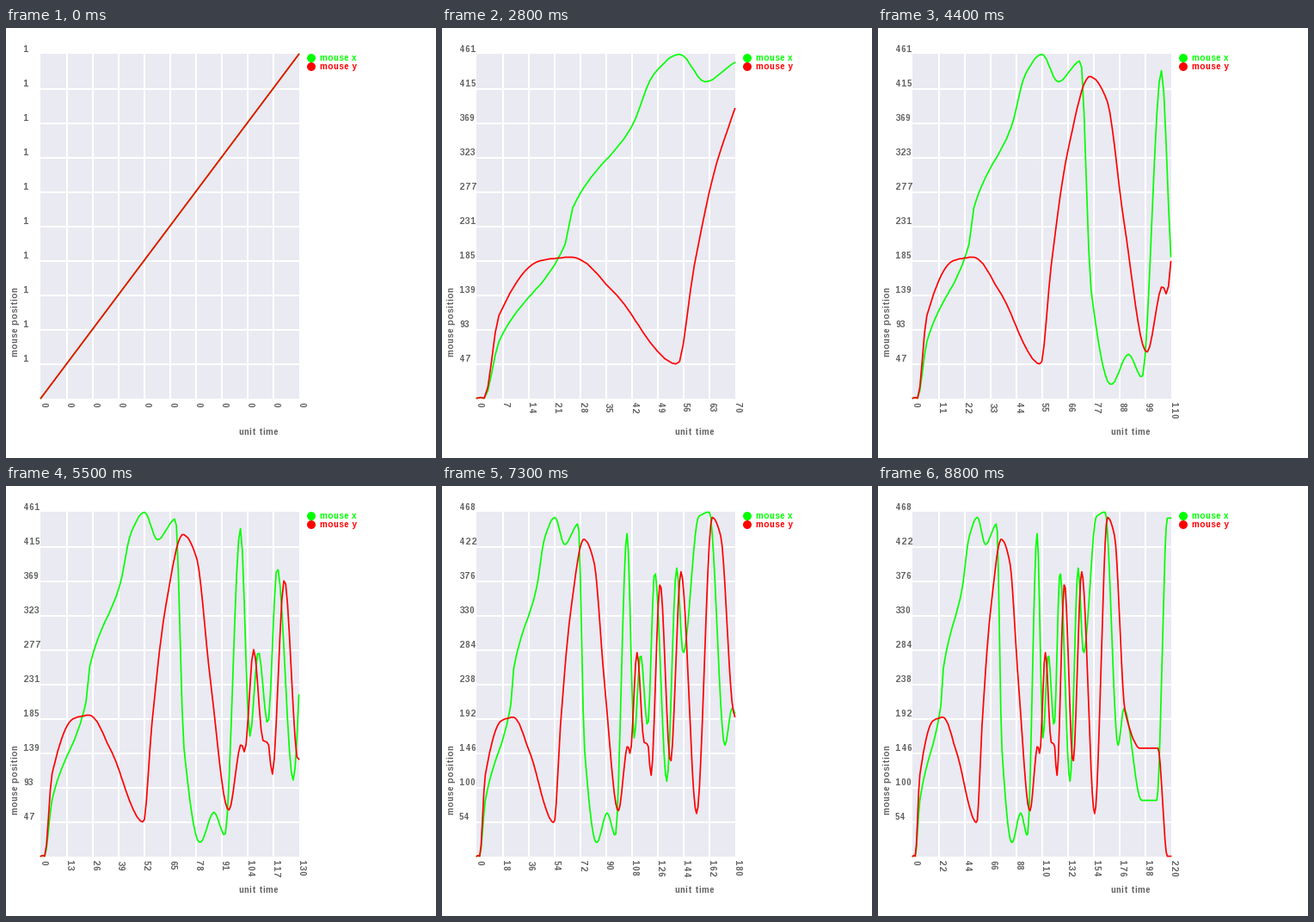
These frames come from a looping animation (500x500 px, 8.9 s). A matplotlib script:

```python
import numpy as np
import matplotlib.pyplot as plt
from matplotlib.animation import FuncAnimation
from matplotlib.patches import Circle, Rectangle

# Whole-pixel letter spacing
plt.rcParams["text.hinting_factor"] = 1

SIZE, DPI = 500, 100
FRAMES, INTERVAL = 89, 100
PX = 72 / DPI
LEFT, TOP, WIDTH, HEIGHT, TICKS = 40, 30, 300, 400, 10
STEP_X, STEP_Y = WIDTH // TICKS, HEIGHT // TICKS
SAMPLES_PER_FRAME = 2.5
GREY, GREEN, RED = "#646464", "#00ff00", "#ff0000"

# Where each hand movement turns: (sample, position)
TURNS_X = [
    (0, 0), (1, 1), (2, 0), (6, 76), (24, 207), (26, 255), (42, 364),
    (48, 434), (55, 461), (62, 424), (71.5, 452), (76, 145), (84.5, 18),
    (92, 59), (97.7, 28), (106, 439), (111, 161), (115.5, 275), (120.5, 177),
    (125.5, 387), (134, 102), (141, 392), (145.5, 276), (156.5, 462),
    (164, 468), (175, 151), (180, 201), (195, 76), (208, 76), (217, 460),
    (220, 460),
]
TURNS_Y = [
    (0, 0), (1, 1), (2, 0), (6, 111), (17, 184), (26, 189), (37, 143),
    (54.5, 46), (59, 178), (66, 330), (75.5, 431), (82.5, 402), (90, 237),
    (99.8, 62), (106.5, 150), (108.2, 140), (113, 277), (118, 155),
    (120.7, 152), (122.8, 109), (129.3, 371), (136.6, 128), (144, 387),
    (155, 58), (166, 461), (172, 436), (181, 197), (194, 147), (209, 147),
    (217, 0), (220, 0),
]


def trace(turns):
    """Monotone cubic easing between turns, sampled at whole steps."""
    t, v = np.array(turns, float).T
    h = np.diff(t)
    d = np.diff(v) / h
    m = np.zeros(len(t))
    same = d[:-1] * d[1:] > 0
    a, b = d[:-1][same], d[1:][same]
    m[1:-1][same] = 2 * a * b / (a + b)
    s = np.arange(int(t[-1]) + 1)
    k = np.clip(np.searchsorted(t, s, side="right") - 1, 0, len(h) - 1)
    u = (s - t[k]) / h[k]
    rise = u * u * (3 - 2 * u)
    bend = h[k] * (u * (1 - u) ** 2 * m[k] - u * u * (1 - u) * m[k + 1])
    return np.rint(v[k] + rise * (v[k + 1] - v[k]) + bend)


fig = plt.figure(figsize=(SIZE / DPI, SIZE / DPI), dpi=DPI, facecolor="white")
ax = fig.add_axes([0, 0, 1, 1])
ax.set_xlim(0, SIZE)
ax.set_ylim(SIZE, 0)
ax.axis("off")


def label(x, y, text="", color=GREY, angle=0):
    return ax.text(x, y, text, color=color, rotation=angle,
                   rotation_mode="anchor", ha="left", va="baseline",
                   family="Liberation Sans", weight="bold", size=10 * PX)


def block(x, y, w, h, color):
    ax.add_patch(Rectangle((x, y), w, h, fc=color, lw=0, antialiased=False))


block(LEFT, TOP, WIDTH + 1, HEIGHT + 1, "#eaeaf2")
for i in range(1, TICKS):
    block(LEFT + i * STEP_X, TOP, 2, HEIGHT + 1, "white")
    block(LEFT, TOP + i * STEP_Y, WIDTH + 1, 2, "white")

label(271, 473, "unit time")
label(14, 382, "mouse position", angle=90)
x_labels = [label(40 + i * STEP_X, 435, angle=-90) for i in range(TICKS + 1)]
y_labels = [label(20, 28 + i * STEP_Y) for i in range(TICKS)]

traces, lines = [], []
for y, name, color, turns in [(35, "mouse x", GREEN, TURNS_X),
                              (45, "mouse y", RED, TURNS_Y)]:
    ax.add_patch(Circle((355, y), 5, fc=color, lw=0))
    label(365, y + 3, name, color)
    traces.append(trace(turns))
    lines += ax.plot([], [], color=color, lw=1.7 * PX,
                     solid_joinstyle="round")


def update(frame):
    last = max(1, int(SAMPLES_PER_FRAME * frame))
    top = int(max(values[:last + 1].max() for values in traces))
    xs = LEFT + 0.5 + WIDTH * np.arange(last + 1) / last
    for line, values in zip(lines, traces):
        line.set_data(xs, TOP + 0.5 + HEIGHT * (1 - values[:last + 1] / top))
    for i, text in enumerate(x_labels):
        text.set_text(str(i * (last // TICKS)))
    for i, text in enumerate(y_labels):
        text.set_text(str(top - i * (top // TICKS)))
    return lines + x_labels + y_labels


anim = FuncAnimation(fig, update, frames=FRAMES, interval=INTERVAL,
                     repeat=True, repeat_delay=0, blit=False)
plt.show()
```
